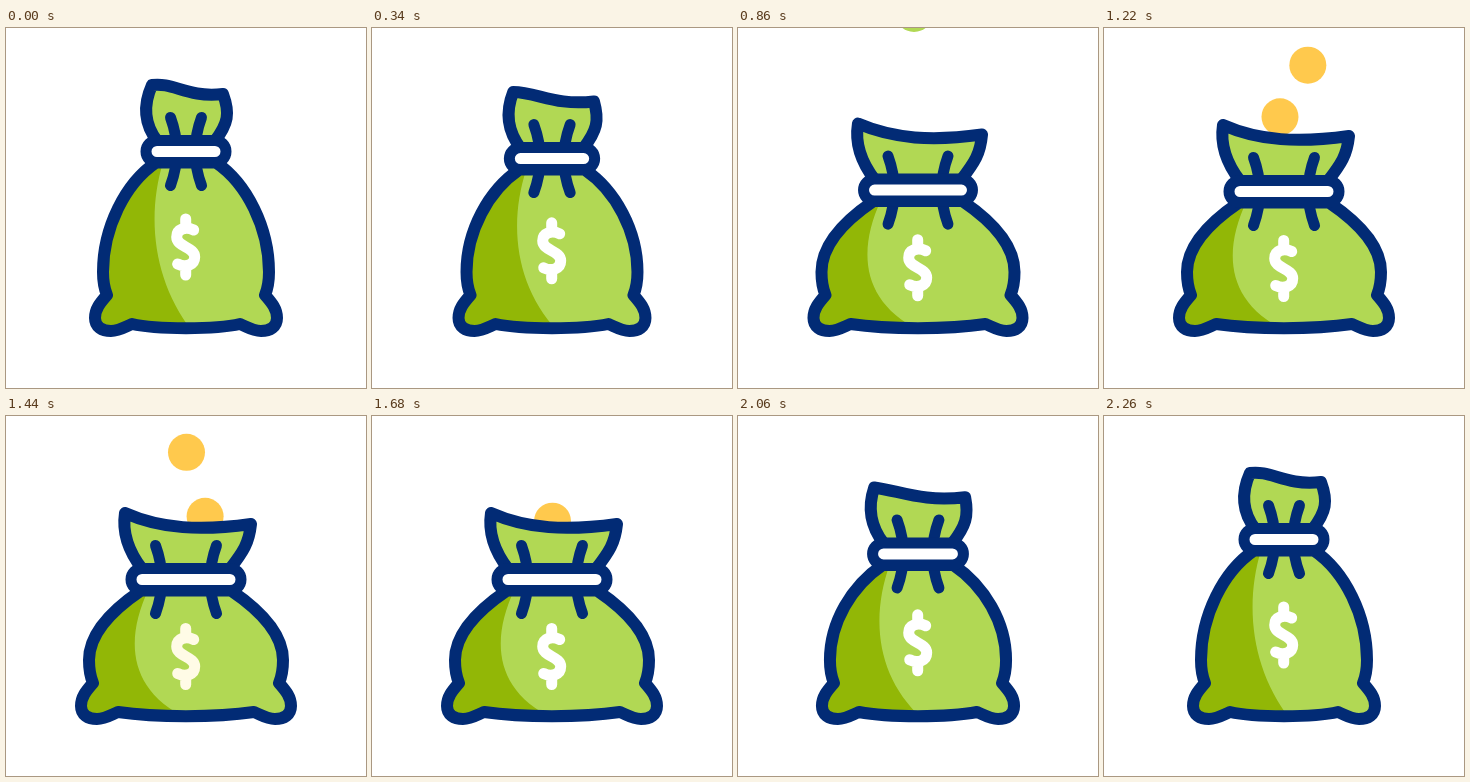
Animation, 360 px wide and 360 px high, one loop 2400 ms. Source, as an HTML page:

```html
<!DOCTYPE html>
<html lang="en">
<head>
<meta charset="utf-8">
<title>Money bag</title>
<style>
  html, body { margin: 0; width: 100%; height: 100%; overflow: hidden; background: #fff; }
  svg { display: block; width: 100vw; height: 100vh; }
  .line { fill: none; stroke: #022b75; stroke-width: 12; stroke-linecap: round; stroke-linejoin: round; }
  #neck, #fill { fill: #b1d854; }
  #shade { fill: #92b706; }
  #cords { stroke-width: 11; }
  #band { fill: #fff; stroke-width: 11; }
  #dollar { fill: none; stroke: #fff; stroke-width: 11; stroke-linecap: round; stroke-linejoin: round; }
</style>
</head>
<body>
<svg viewBox="0 0 360 360">
  <g id="coins"></g>
  <path id="neck" class="line"/>
  <clipPath id="inside"><path id="clip"/></clipPath>
  <path id="fill"/>
  <path id="shade" clip-path="url(#inside)"/>
  <path id="body" class="line"/>
  <path id="cords" class="line"/>
  <rect id="band" class="line" height="22" rx="11"/>
  <path id="dollar" d="M8-17C0-21-9-18-9-10C-9 0 9 0 9 10C9 18 0 21-8 17M0-28V-20M0 20V28"/>
</svg>
<script>
const LOOP = 2400;
const $ = id => document.getElementById(id);
const clamp = v => Math.min(1, Math.max(0, v));
const mirror = ([x, y]) => [360 - x, y];
const curve = pts => `M${pts[0]}C${pts.slice(1).join(' ')}`;

function bezier(x1, y1, x2, y2) {
  const at = (a, b, s) => 3 * a * s * (1 - s) ** 2 + 3 * b * s * s * (1 - s) + s ** 3;
  return x => {
    let lo = 0, hi = 1;
    for (let i = 0; i < 24; i++) {
      const mid = (lo + hi) / 2;
      if (at(x1, x2, mid) < x) lo = mid; else hi = mid;
    }
    return at(y1, y2, (lo + hi) / 2);
  };
}
const easeOpen = bezier(.2, 0, .45, 1);
const easeClose = bezier(.33, 0, .67, 1);

const openness = t => t < 1400
  ? easeOpen(clamp((t - 200) / 800))
  : 1 - easeClose(clamp((t - 1770) / 490));

// k runs from 0 (tied shut) to 1 (wide open).
function drawBag(k) {
  const mix = (a, b) => a + (b - a) * k;
  const band = mix(123.5, 163.5);   // height of the tie
  const tie = mix(150, 135);        // left end of the gathered cloth
  const waist = mix(97, 83);        // left side at its widest

  const half = [
    [tie, band + 11],
    [tie - 31, band + 32], [waist, mix(200, 218)], [waist, 244],
    [waist, 253], [waist + 1, 260], [waist + 4, 267],
    [waist - 3, 275], [waist - 8, 281], [waist - 8, 290],
    [waist - 8, 299], [waist - 1, 303], [waist + 8, 303],
    [waist + 16, 303], [waist + 22, 299], [waist + 29, 296],
    [150, 301.5]
  ];
  const bag = curve([...half, ...half.map(mirror).reverse()]) + 'Z';
  for (const id of ['clip', 'fill', 'body']) $(id).setAttribute('d', bag);

  const base = [tie + 1.5, band - 10], pinch = [tie - 12.5, band - 28];
  const [lx, ly] = [mix(146, 119), mix(57, 97)];
  const [rx, ry] = [mix(217, 245), mix(66, 108)];
  $('neck').setAttribute('d', curve([
    base, pinch, [lx + mix(-9, -3), ly + 20], [lx, ly],
    [lx + mix(22, 36), ly + mix(-3, 16)], [rx - mix(37, 50), ry + mix(4, 7)], [rx, ry],
    [rx + mix(7, -2), ry + 19], mirror(pinch), mirror(base)
  ]) + 'Z');

  $('shade').setAttribute('d', curve([
    [tie + 7, band + 11], [mix(140, 120), mix(190, 222)],
    [mix(148, 120), mix(255, 274)], [mix(187, 184), 304]
  ]) + 'H60V130Z');

  const cord = [[tie + 14.5, band - 34], [tie + 27, band], [tie + 14.5, band + 34]];
  const bow = ([a, b, c]) => `M${a}Q${b} ${c}`;
  $('cords').setAttribute('d', bow(cord) + bow(cord.map(mirror)));

  $('band').setAttribute('x', tie - 10);
  $('band').setAttribute('y', band - 11);
  $('band').setAttribute('width', 380 - 2 * tie);
  $('dollar').setAttribute('transform', `translate(179.7 ${mix(219, 240.5)})`);
}

const SPEED = .287, R = 18.5;
const coins = [
  { enter: 847, x: 176, drift: 0 },
  { enter: 1027, x: 208, drift: -.0215 },
  { enter: 1250, x: 180.5, drift: 0 }
].map(c => {
  const el = document.createElementNS('http://www.w3.org/2000/svg', 'circle');
  el.setAttribute('r', R);
  $('coins').append(el);
  return { ...c, el };
});

function draw(t) {
  drawBag(openness(t));
  for (const { el, enter, x, drift } of coins) {
    const age = t - enter, y = age * SPEED - R;
    el.setAttribute('cx', x + age * drift);
    el.setAttribute('cy', y);
    el.setAttribute('fill', t < 880 ? '#b1d854' : '#ffc94d');
    el.setAttribute('visibility', age > 0 && y < 132 ? 'visible' : 'hidden');
  }
  // Brief warm tint on the dollar sign.
  const warm = clamp(1 - Math.abs(t - 1440) / 100);
  $('dollar').style.stroke = `rgb(255,${255 - 4 * warm},${255 - 25 * warm})`;
}

const start = performance.now();
function tick() {
  draw((performance.now() - start) % LOOP);
  requestAnimationFrame(tick);
}
tick();
</script>
</body>
</html>
```
